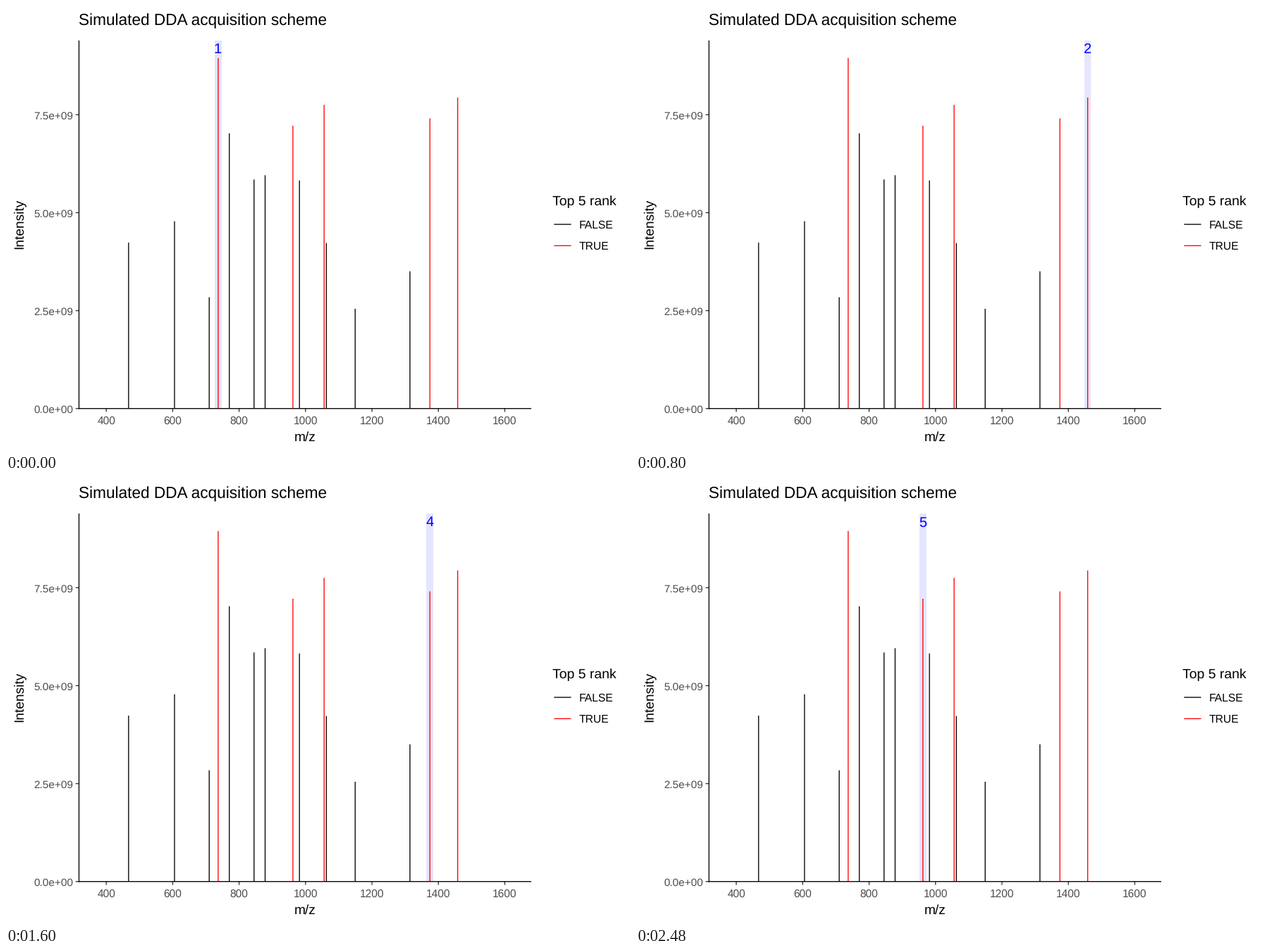
These frames come from a looping animation (885 px wide and 632 px high, 2.8 s). A matplotlib script:

```python
import matplotlib.pyplot as plt
from matplotlib.animation import FuncAnimation
from matplotlib.patches import Rectangle

plt.rcParams["font.family"] = "Liberation Sans"
plt.rcParams["text.hinting"] = "none"

W, H, DPI = 885, 632, 100
LEFT, RIGHT, TOP, BOTTOM = 103.5, 745, 49, 571.7
LINE, TICK = 1.33, 4.8
GREY, DARK = "#4d4d4d", "#333333"
TOP_N, WINDOW = 5, 20

# Simulated spectrum: m/z -> intensity in 1e9
PEAKS = {467.2: 4.236, 605.5: 4.781, 710: 2.841, 737: 8.949, 770.5: 7.027,
         845: 5.847, 878.3: 5.956, 962: 7.22, 981.7: 5.821, 1056: 7.752,
         1062.8: 4.224, 1149.5: 2.547, 1314.4: 3.503, 1374.5: 7.407,
         1458.2: 7.939}
ranked = sorted(PEAKS, key=PEAKS.get, reverse=True)[:TOP_N]

fig = plt.figure(figsize=(W / DPI, H / DPI), dpi=DPI, facecolor="white")
ax = fig.add_axes([0, 0, 1, 1])
ax.set_xlim(0, W)
ax.set_ylim(H, 0)
ax.axis("off")


def px(mz):
    return 142.2 + 0.471 * (mz - 400)


def py(intensity):
    return BOTTOM - 55.64 * intensity


def line(x0, y0, x1, y1, color="black", z=2):
    ax.plot([x0, x1], [y0, y1], color=color, lw=LINE * 72 / DPI, zorder=z,
            solid_capstyle="butt", snap=False)


def text(x, y, s, size, color="black", ha="left", **kw):
    return ax.text(x, y, s, fontsize=size * 72 / DPI, color=color, ha=ha,
                   va="baseline", zorder=5, **kw)


for mz, intensity in PEAKS.items():
    top = mz in ranked
    line(px(mz), BOTTOM, px(mz), py(intensity),
         "red" if top else "black", 3 if top and mz != 1056 else 2)

# Axes
line(LEFT, TOP, LEFT, BOTTOM + LINE / 2, z=4)
line(LEFT - LINE / 2, BOTTOM, RIGHT, BOTTOM, z=4)
for mz in range(400, 1601, 200):
    x = px(mz)
    line(x, BOTTOM, x, BOTTOM + TICK, DARK)
    text(x, 593.5, str(mz), 15.5, GREY, "center")
for i in range(4):
    y = py(2.5 * i)
    line(LEFT - TICK, y, LEFT, y, DARK)
    text(95.3, y + 6, f"{2.5e9 * i:.1e}", 15.4, GREY, "right")

# Titles
text(103.2, 27.3, "Simulated DDA acquisition scheme", 22.6)
text(424.5, 618, "m/z", 19.2, ha="center")
text(24.5, 309, "Intensity", 19.2, ha="center", rotation=90,
     rotation_mode="anchor")

# Legend
text(775, 283.2, "Top 5 rank", 19.4)
for i, (name, color) in enumerate([("FALSE", "black"), ("TRUE", "red")]):
    y = 310.1 + 30.3 * i
    line(777.3, y, 801.5, y, color)
    text(813, y + 5.6, name, 15.6)

# Isolation window jumping through the ranked peaks
band = ax.add_patch(Rectangle((0, TOP), px(WINDOW) - px(0), BOTTOM - TOP,
                              lw=0, facecolor="#e5e5ff", zorder=1))
rank = text(0, 67.3, "", 20, "blue", "center")


def update(frame):
    # The first and last windows are held for two frames
    step = min(max(frame - 1, 0), TOP_N - 1)
    mz = ranked[step]
    band.set_x(px(mz - WINDOW / 2))
    rank.set_x(px(mz) - 0.4)
    rank.set_text(str(step + 1))
    return band, rank


anim = FuncAnimation(fig, update, frames=TOP_N + 2, interval=400,
                     repeat=True, repeat_delay=0, blit=False)
plt.show()
```
